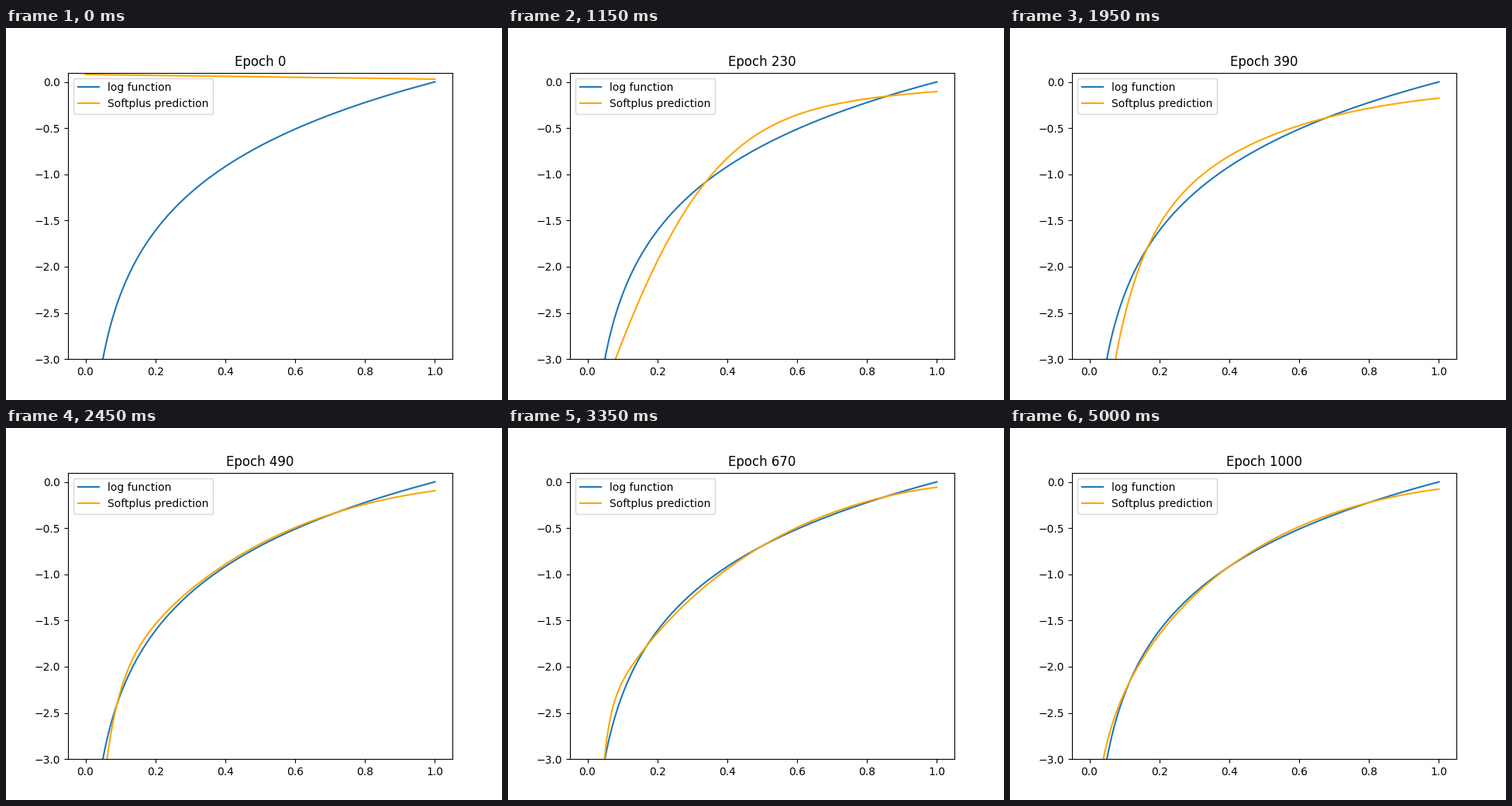
A matplotlib script that plays this animation: 640x480 px, repeating every 5050 ms.

```python
import numpy as np
import matplotlib.pyplot as plt
from matplotlib.animation import FuncAnimation

FRAMES = 101
EPOCHS_PER_FRAME = 10
FLOOR = -5.0  # well below the visible range
BLEND_START, BLEND_END = 230, 390

x = np.linspace(0, 1, 501)
log_x = np.log(np.maximum(x, 1e-3))

# epoch: offset, tilt, bend slope, sharpness, bend position
BEND = {
    0: (0.08, -0.05, 0, 3, 0.6),
    40: (-0.5, 0, 1.2, 3, 0.6),
    110: (0.04, 0, 5, 4, 0.55),
    230: (-0.29, 0.2, 13.2, 6.5, 0.24),
}

# epoch: swing, centre, base, crossing, drop height, drop width
ERROR = {
    390: (0.06, -1.2, 0.37, 0.68, 0.95, 0.08),
    490: (0.227, -1.0, 0.065, 0.72, 0.95, 0.037),
    670: (0.29, -1.23, -0.084, 0.85, 0.47, 0.018),
    850: (0.225, -1.405, -0.071, 0.82, 0.13, 0.018),
    1000: (0.177, -1.538, -0.0685, 0.8, 0.02, 0.018),
}


def params_at(keys, epoch):
    return [np.interp(epoch, list(keys), column)
            for column in zip(*keys.values())]


def bent_line(epoch):
    """A tilted line with one softplus bend."""
    offset, tilt, slope, sharp, pos = params_at(BEND, epoch)
    return offset + tilt * x - slope / sharp * np.logaddexp(0, sharp * (pos - x))


def near_log(epoch):
    """The log plus a wavy error that drops off sharply near zero."""
    swing, centre, base, cross, height, width = params_at(ERROR, epoch)
    wave = (swing * (log_x - centre) ** 2 + base) * (np.log(cross) - log_x)
    drop = height * np.exp((0.05 - x) / width)
    return np.maximum(log_x + np.sqrt(x) * wave - drop, FLOOR)


def predict(epoch):
    mix = np.interp(epoch, [BLEND_START, BLEND_END], [0, 1])
    return (1 - mix) * bent_line(epoch) + mix * near_log(epoch)


fig, ax = plt.subplots(figsize=(6.4, 4.8), dpi=100)
ax.plot(x[1:], log_x[1:], label="log function")
prediction, = ax.plot(x, predict(0), color="orange",
                      label="Softplus prediction")
ax.set_xlim(-0.05, 1.05)
ax.set_ylim(-3, 0.1)
ax.legend(loc="upper left")
title = ax.set_title("Epoch 0")


def update(frame):
    epoch = frame * EPOCHS_PER_FRAME
    prediction.set_ydata(predict(epoch))
    title.set_text(f"Epoch {epoch}")
    return prediction, title


def init():
    return update(0)


anim = FuncAnimation(fig, update, frames=FRAMES, init_func=init,
                     interval=50, repeat=True, repeat_delay=0, blit=False)
plt.show()
```
